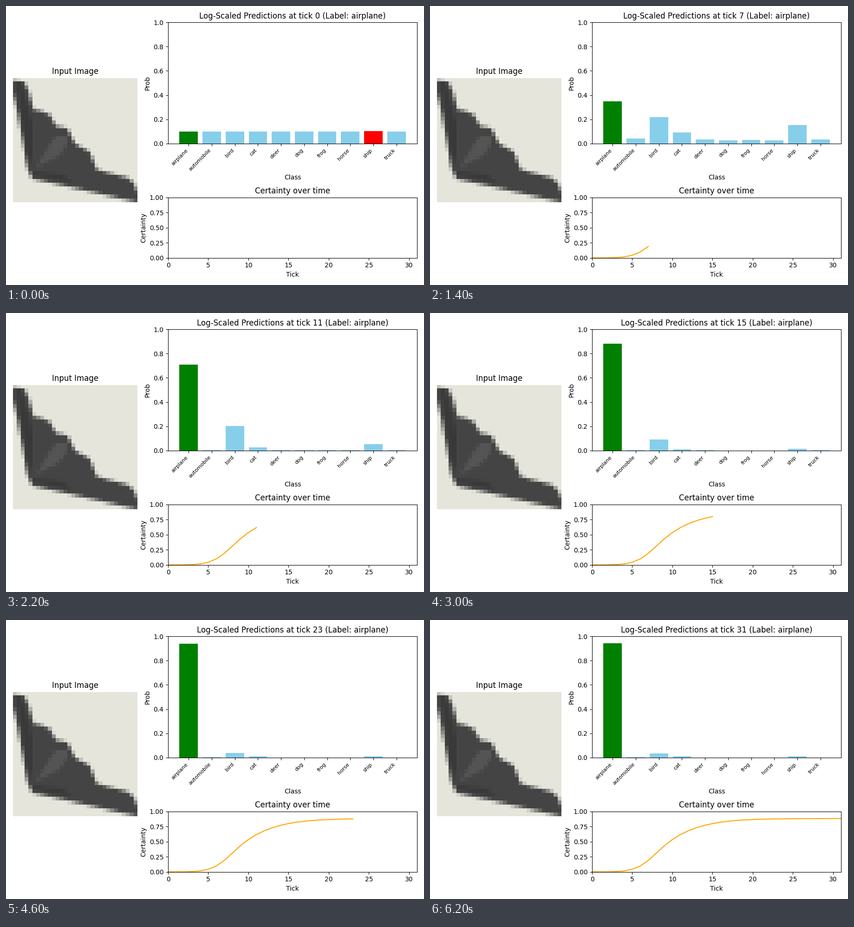
These frames come from a looping animation (900x600 px, 6.4 s). A matplotlib script:

```python
import numpy as np
import matplotlib.pyplot as plt
from matplotlib.animation import FuncAnimation
from matplotlib.path import Path

plt.rcParams["font.family"] = "DejaVu Sans"

W, H, DPI = 900, 600, 100
TICKS, STEP_MS = 32, 200
LABEL = 0

# How far each class's log probability finally falls behind the label's.
DROP = {"airplane": 0, "automobile": 7.8, "bird": 3.4, "cat": 4.75,
        "deer": 8.2, "dog": 9.1, "frog": 8.6, "horse": 9.4,
        "ship": 4.55, "truck": 8.2}
CLASSES = list(DROP)

# Midpoint and rate of the fall; the close rivals fade later.
FADE = {"bird": (12.4, .31), "ship": (10.2, .45)}
DEFAULT_FADE = (8.9, .45)
SHIP_LEAD = .01


def sigmoid(x):
    return 1 / (1 + np.exp(-x))


def probs_at(tick):
    """Softmax over logits that fall along sigmoids from an even start."""
    logits = []
    for name, drop in DROP.items():
        mid, rate = FADE.get(name, DEFAULT_FADE)
        fall = sigmoid(rate * (tick - mid)) - sigmoid(-rate * mid)
        logits.append((SHIP_LEAD if name == "ship" else 0) - drop * fall)
    weights = np.exp(logits)
    return weights / weights.sum()


def certainty_at(tick):
    """One minus the normalised entropy."""
    probs = probs_at(tick)
    return 1 + (probs * np.log(probs)).sum() / np.log(len(probs))


def coverage(points, size=32, sub=8):
    """Share of each cell of a size x size grid covered by a polygon."""
    centres = (np.arange(size * sub) + 0.5) / sub
    gx, gy = np.meshgrid(centres, centres)
    inside = Path(points).contains_points(np.c_[gx.ravel(), gy.ravel()])
    return inside.reshape(size, sub, size, sub).mean(axis=(1, 3))[..., None]


def make_picture():
    body = [(0, .7), (3, 1.1), (4.1, 3.5), (5.3, 8.2), (7, 8.5), (9.5, 9.5),
            (11, 12.4), (14, 13), (16, 17), (19.8, 19), (21.5, 23.5),
            (24, 24.3), (29.5, 25.7), (31, 27), (32, 29.5), (32, 32),
            (5, 26), (3.8, 23.5), (2.6, 17), (1, 8), (0, 4)]
    dark_strip = [(1, 1), (2, 1), (5, 12), (5, 20), (4, 23), (2, 9)]
    dark_edge = [(5, 24), (13, 25), (15, 27), (5, 25)]
    light_patch = [(11, 15), (14, 15), (14, 17), (12, 20), (6, 23), (9, 18)]
    picture = np.full((32, 32, 3), (229, 229, 220), float)
    for points, grey in ((body, 68), (dark_strip, 57), (dark_edge, 57),
                         (light_patch, 84)):
        alpha = coverage(points)
        picture = picture * (1 - alpha) + grey * alpha
    return picture.round().astype(np.uint8)


def add_axes(left, bottom, width, height):
    return fig.add_axes((left / W, bottom / H, width / W, height / H))


fig = plt.figure(figsize=(W / DPI, H / DPI), dpi=DPI, facecolor="white")

image_ax = add_axes(15, 177.6, 268, 267.8)
image_ax.imshow(make_picture(), aspect="auto", interpolation="nearest")
image_ax.set_title("Input Image")
image_ax.axis("off")

prob_ax = add_axes(349, 304.4, 536, 260.2)
bars = prob_ax.bar(range(len(CLASSES)), probs_at(0))
prob_ax.set_ylim(0, 1)
prob_ax.set_xticks(range(len(CLASSES)))
prob_ax.set_xticklabels(CLASSES, rotation=45, ha="right", fontsize=8)
prob_ax.set_xlabel("Class")
prob_ax.set_ylabel("Prob")
prob_title = prob_ax.set_title("")

cert_ax = add_axes(349, 58.25, 536, 130.1)
line, = cert_ax.plot([], [], color="orange")
cert_ax.set_xlim(0, TICKS - 1)
cert_ax.set_ylim(0, 1)
cert_ax.set_yticks(np.linspace(0, 1, 5))
cert_ax.set_xlabel("Tick")
cert_ax.set_ylabel("Certainty")
cert_ax.set_title("Certainty over time")


def bar_color(index, predicted):
    if index == LABEL:
        return "green"
    return "red" if index == predicted else "skyblue"


def update(tick):
    probs = probs_at(tick)
    predicted = int(probs.argmax())
    for i, (bar, prob) in enumerate(zip(bars, probs)):
        bar.set_height(prob)
        bar.set_facecolor(bar_color(i, predicted))
    prob_title.set_text(
        f"Log-Scaled Predictions at tick {tick} (Label: {CLASSES[LABEL]})")
    past = range(tick + 1)
    line.set_data(past, [certainty_at(t) for t in past])
    return [*bars, prob_title, line]


anim = FuncAnimation(fig, update, frames=TICKS, interval=STEP_MS, repeat=True)
plt.show()
```
